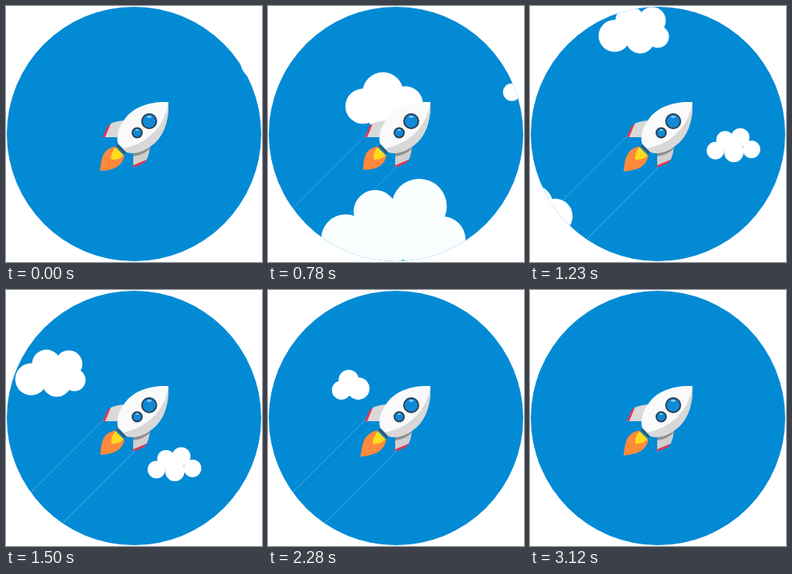
An HTML page for the animation above (3150 ms loop, 320 px wide and 320 px high).

```html
<!DOCTYPE html>
<html lang="en">
<head>
<meta charset="utf-8">
<title>Rocket</title>
<style>
  html, body { margin: 0; height: 100%; overflow: hidden; background: #fff; }
  svg { display: block; width: 100%; height: 100%; }
</style>
</head>
<body>
<svg viewBox="0 0 320 320">
  <defs>
    <clipPath id="disc"><circle cx="160" cy="160" r="159"/></clipPath>
    <path id="hull" d="M203 120C178 119 158 127 148 142C140 153 138 162 140 172L151 183C161 185 170 183 181 175C196 165 204 145 203 120Z"/>
    <clipPath id="hullClip"><use href="#hull"/></clipPath>
  </defs>
  <circle cx="160" cy="160" r="159" fill="#028ad4"/>
  <g clip-path="url(#disc)">
    <path id="trails" d="M122 162L22 262M160 202L60 302" stroke="#cfe6ff"/>
    <g id="back" fill="#fff"></g>

    <path id="flame" fill="#ff8a3c"/>
    <path id="core" fill="#ffdc1f"/>

    <path d="M131 147Q140 143 151 143L139 164L121 164Z" fill="#d9d9d9"/>
    <path d="M131 147L127 150L121 164L124 164Z" fill="#e8364f"/>
    <path d="M176 192Q180 183 180 172L159 184L159 202Z" fill="#cfcfcf"/>
    <path d="M180 172L159 184V188Q172 186 179 179Z" fill="#8f8f8f"/>
    <path d="M176 192L173 196L159 202L159 199Z" fill="#e8364f"/>

    <path d="M139 174L149 184" stroke="#44525c" stroke-width="2.5"/>
    <use href="#hull" fill="#fafafa"/>
    <path d="M203 120C200 146 180 172 146 178L150 190L210 190V120Z" fill="#d8d8d8" clip-path="url(#hullClip)"/>

    <g fill="#1089d6" stroke="#2c4257" stroke-width="2">
      <circle cx="179" cy="144" r="9"/>
      <circle cx="164" cy="158.500" r="6"/>
    </g>
    <g fill="#8fd0f5">
      <ellipse cx="179" cy="138.500" rx="3" ry="1.300"/>
      <ellipse cx="164" cy="155" rx="2" ry="1"/>
    </g>
    <g id="front" fill="#fafeff"></g>
  </g>
</svg>
<script>
const LOOP = 3150;
const $ = id => document.getElementById(id);

// Each cloud drifts down-left; its lobes [x, y, r] are placed as they stand at time `at`.
const clouds = [
  { layer: 'front', at: 480, speed: .289, lobes: [[184, 204, 30.5], [221, 170, 27], [276, 163.5, 34.5], [229, 212, 32], [270, 213, 22], [305, 205, 29], [250, 195, 30]] },
  { layer: 'back', at: 780, speed: .312, lobes: [[119, 125, 22], [144, 108, 25.5], [172, 122, 22], [142, 133, 20]] },
  { layer: 'back', at: 1230, speed: .275, lobes: [[106, 37, 20], [125, 18, 18], [153, 18, 17], [160, 38, 14], [138, 41, 18]] },
  { layer: 'back', at: 1230, speed: .162, lobes: [[232, 180.5, 11], [244, 167, 11], [263, 164, 11.5], [277, 179, 11], [255, 183, 12], [254, 174, 12]] },
  { layer: 'back', at: 1800, speed: .177, lobes: [[177, 40, 12], [186, 27, 12.5], [198, 38, 14]] }
];

for (const cloud of clouds) {
  cloud.node = document.createElementNS('http://www.w3.org/2000/svg', 'g');
  cloud.node.innerHTML = cloud.lobes.map(([x, y, r]) => `<circle cx="${x}" cy="${y}" r="${r}"/>`).join('');
  $(cloud.layer).append(cloud.node);
}

function draw(t) {
  for (const { node, at, speed } of clouds) {
    const d = (t - at) * speed;
    node.setAttribute('transform', `translate(${-d} ${d})`);
  }
  $('trails').setAttribute('opacity', .4 * Math.sin(Math.PI * (t / LOOP) ** 1.25));

  // The flame stretches along the rocket's axis.
  const s = 1.9 - 1.9 * Math.sin(2 * Math.PI * t / 630 + .3);
  $('flame').setAttribute('d', `M136 175.500C120 180 ${120 - s / 2} 190 ${119 - s} ${205 + s}C${134 + s / 4} ${204 + s / 2} 144 202 148 187.500Z`);
  $('core').setAttribute('d', `M137 176.500Q131 183 ${132 - s / 3} ${191.500 + s / 3}Q141 193 147 186.500Z`);
}

const start = performance.now();
function frame() {
  draw((performance.now() - start) % LOOP);
  requestAnimationFrame(frame);
}
frame();
</script>
</body>
</html>
```
